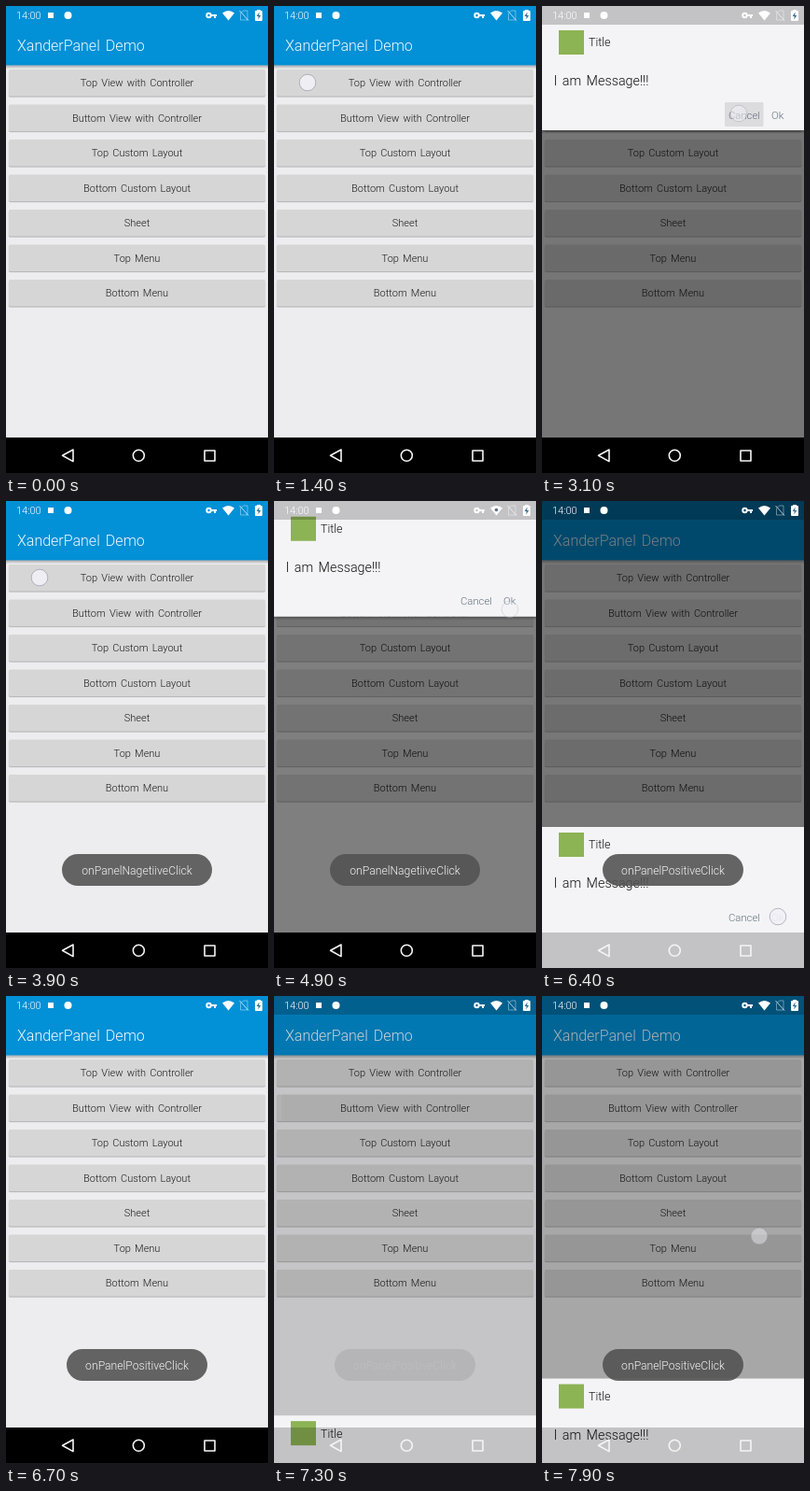
Animation, 281 px wide and 500 px high, one loop 8000 ms. Source, as an HTML page with a canvas:

```html
<!DOCTYPE html>
<html lang="en">
<head>
<meta charset="utf-8">
<title>Panel demo</title>
<style>
  html, body { margin: 0; width: 100%; height: 100%; overflow: hidden; background: #000; }
  canvas { display: block; width: 100vw; height: 100vh; }
</style>
</head>
<body>
<canvas id="stage"></canvas>
<script>
const W = 281, H = 500, LOOP = 8000;
const STATUS_H = 20, NAV_Y = 462, CONTENT_H = 113;
const ENTER = 340, EXIT = 300;

const canvas = document.getElementById('stage');
const ctx = canvas.getContext('2d');
const ratio = window.devicePixelRatio || 1;
canvas.width = W * ratio;
canvas.height = H * ratio;

const buttons = ['Top View with Controller', 'Buttom View with Controller', 'Top Custom Layout',
  'Bottom Custom Layout', 'Sheet', 'Top Menu', 'Bottom Menu'];

const panels = [
  { side: 'top', open: 1540, close: 3180 },
  { side: 'top', open: 3945, close: 4850 },
  { side: 'bottom', open: 5567, close: 6400 },
  { side: 'bottom', open: 7167, close: 7770 }
];

const touches = [
  { x: 36, y: 82, from: 1390, to: 1570 },
  { x: 211, y: 115, from: 3090, to: 3250, strength: .6 },
  { x: 36, y: 82, from: 3890, to: 4070 },
  { x: 253, y: 116, from: 4790, to: 4950 },
  { x: 27, y: 125, from: 5460, to: 5650 },
  { x: 253, y: 445, from: 6390, to: 6560 },
  { x: 27, y: 125, from: 7060, to: 7250 },
  { x: 233, y: 257, from: 7790, to: 7980, strength: .75 }
];

const toasts = [
  { text: 'onPanelNagetiiveClick', width: 161, from: 3300, to: 5250 },
  { text: 'onPanelPositiveClick', width: 151, from: 5330, to: 7150 },
  { text: 'onPanelPositiveClick', width: 151, from: 7270, to: 9500 }
];

const clamp = v => Math.max(0, Math.min(1, v));
const ease = v => (1 - Math.cos(Math.PI * clamp(v))) / 2;

function rect(x, y, w, h, color) {
  ctx.fillStyle = color;
  ctx.fillRect(x, y, w, h);
}

function round(x, y, w, h, r, color) {
  ctx.fillStyle = color;
  ctx.beginPath();
  ctx.roundRect(x, y, w, h, r);
  ctx.fill();
}

function poly(points, color, stroke) {
  ctx.beginPath();
  points.forEach(([x, y]) => ctx.lineTo(x, y));
  if (stroke) {
    ctx.strokeStyle = color;
    ctx.lineWidth = stroke;
    ctx.closePath();
    ctx.stroke();
  } else {
    ctx.fillStyle = color;
    ctx.fill();
  }
}

function disc(x, y, r, color) {
  ctx.fillStyle = color;
  ctx.beginPath();
  ctx.arc(x, y, r, 0, 7);
  ctx.fill();
}

function ring(x, y, r, color, width) {
  ctx.strokeStyle = color;
  ctx.lineWidth = width;
  ctx.beginPath();
  ctx.arc(x, y, r, 0, 7);
  ctx.stroke();
}

// y is the middle of the capital letters
function text(str, x, y, size, color, align = 'left') {
  ctx.font = `300 ${size}px Roboto, "Open Sans", sans-serif`;
  ctx.wordSpacing = size * .14 + 'px';
  ctx.textAlign = align;
  ctx.fillStyle = color;
  ctx.fillText(str, x, y + size * .355);
}

function shade(y, h, strength) {
  const g = ctx.createLinearGradient(0, y, 0, y + h);
  g.addColorStop(0, `rgba(0,0,0,${strength})`);
  g.addColorStop(1, 'rgba(0,0,0,0)');
  rect(0, y, W, h, g);
}

function drawPage(t) {
  rect(0, 0, W, H, '#ededef');
  buttons.forEach((label, i) => {
    const y = 82.5 + i * 37.5;
    round(2.5, y - 13, 276, 28.5, 2, 'rgba(0,0,0,.07)');
    round(3, y - 14, 275, 29, 1.5, '#b9b9bb');
    round(3, y - 14.5, 275, 28.5, 1.5, '#d6d6d6');
    if (i === 1) drawRipple(t, y);
    text(label, 140.5, y, 11, '#1c1c1c', 'center');
  });
  rect(0, 0, W, 63.5, '#0290d6');
  shade(63.5, 4, .28);
  text('XanderPanel Demo', 12, 42, 16, '#f2faff');
}

function drawRipple(t, y) {
  for (const start of [5460, 7060]) {
    const age = t - start;
    if (age < 0 || age > 300) continue;
    ctx.save();
    ctx.beginPath();
    ctx.rect(8, y - 14.5, 270, 28.5);
    ctx.clip();
    disc(27, 125, age * 1.2, `rgba(0,0,0,${.055 * clamp((300 - age) / 120)})`);
    ctx.restore();
  }
}

function drawPanel(side, p, t) {
  const top = side === 'top';
  const h = CONTENT_H + (top ? STATUS_H : H - NAV_Y);
  const y = top ? (p - 1) * h : H - p * h;
  rect(0, 0, W, NAV_Y, `rgba(0,0,0,${.5 * p})`);
  if (top) shade(y + h, 4, .3);
  rect(0, y, W, h, '#f4f4f6');

  const c = top ? y + STATUS_H : y;
  rect(18, c + 6, 27, 26, '#8cb354');
  text('Title', 50, c + 19, 12.5, '#111');
  text('I am Message!!!', 12.5, c + 60, 14.3, '#111');
  if (t > 3080 && t < 3280) round(196, c + 83, 41.5, 26, 1, '#dcdcde');
  text('Cancel', 200, c + 96.5, 11.3, '#61707c');
  text('Ok', 246, c + 96.5, 11.5, '#61707c');

  rect(0, 0, W, STATUS_H, 'rgba(0,0,0,.2)');
  if (!top) {
    const from = Math.max(y, NAV_Y);
    rect(0, from, W, H - from, 'rgba(0,0,0,.2)');
  }
}

function drawStatus(t) {
  const white = '#fff';
  text('14:00', 11, 10.5, 11, white);
  rect(45, 7, 6, 6, white);
  disc(66.5, 10, 4, white);

  ring(217.5, 10, 2.2, white, 2);
  rect(219.5, 9, 6.5, 2, white);
  rect(223, 10, 2, 3, white);

  ctx.fillStyle = white;
  ctx.beginPath();
  ctx.moveTo(238.5, 15.5);
  ctx.lineTo(232, 7.5);
  ctx.quadraticCurveTo(238.5, 2.5, 245, 7.5);
  ctx.fill();
  if (t > 4300 && t < 5750) disc(238.5, 9.5, 1.8, 'rgba(40,70,90,.75)');

  const faint = 'rgba(255,255,255,.4)';
  poly([[251.5, 8], [254.5, 5], [259, 5], [259, 15], [251.5, 15]], faint, 1);
  poly([[250.5, 5], [260, 15.5]], faint, 1);

  rect(269, 4, 4, 2, white);
  round(267, 5, 8, 11, 1, white);
  poly([[271.6, 6.5], [268.7, 11], [270.7, 11], [270.4, 14.5], [273.3, 10], [271.3, 10]], '#3a6f90');
}

function drawNavIcons() {
  const white = '#f5f5f5';
  ctx.lineJoin = 'round';
  poly([[60.5, 481.3], [72, 475], [72, 487.6]], white, 1.6);
  ring(142.3, 481.3, 6, white, 1.6);
  poly([[213, 476], [224, 476], [224, 487], [213, 487]], white, 1.6);
}

function drawToast(toast, t) {
  const alpha = Math.min(clamp((t - toast.from) / 200), clamp((toast.to - t) / 150));
  if (!alpha) return;
  ctx.globalAlpha = alpha;
  round(140.5 - toast.width / 2, 378, toast.width, 34, 17, 'rgba(83,83,83,.89)');
  text(toast.text, 140.5, 396, 12.2, '#f5f5f5', 'center');
  ctx.globalAlpha = 1;
}

function drawTouch({ x, y, from, to, strength = 1 }, t) {
  if (t < from || t > to) return;
  ctx.globalAlpha = strength * clamp((to - t) / 120);
  disc(x, y, 8.8, 'rgba(242,241,246,.9)');
  ring(x, y, 8.8, 'rgba(150,150,165,.65)', 1);
  ctx.globalAlpha = 1;
}

function draw(t) {
  ctx.setTransform(ratio, 0, 0, ratio, 0, 0);
  drawPage(t);
  rect(0, NAV_Y, W, H - NAV_Y, '#000');
  for (const { side, open, close } of panels) {
    const p = ease((t - open) / ENTER) * (1 - ease((t - close) / EXIT));
    if (p > 0) drawPanel(side, p, t);
  }
  drawStatus(t);
  drawNavIcons();
  toasts.forEach(toast => drawToast(toast, t));
  touches.forEach(touch => drawTouch(touch, t));
}

const begin = performance.now();
function tick() {
  draw((performance.now() - begin) % LOOP);
  requestAnimationFrame(tick);
}
tick();
</script>
</body>
</html>
```
